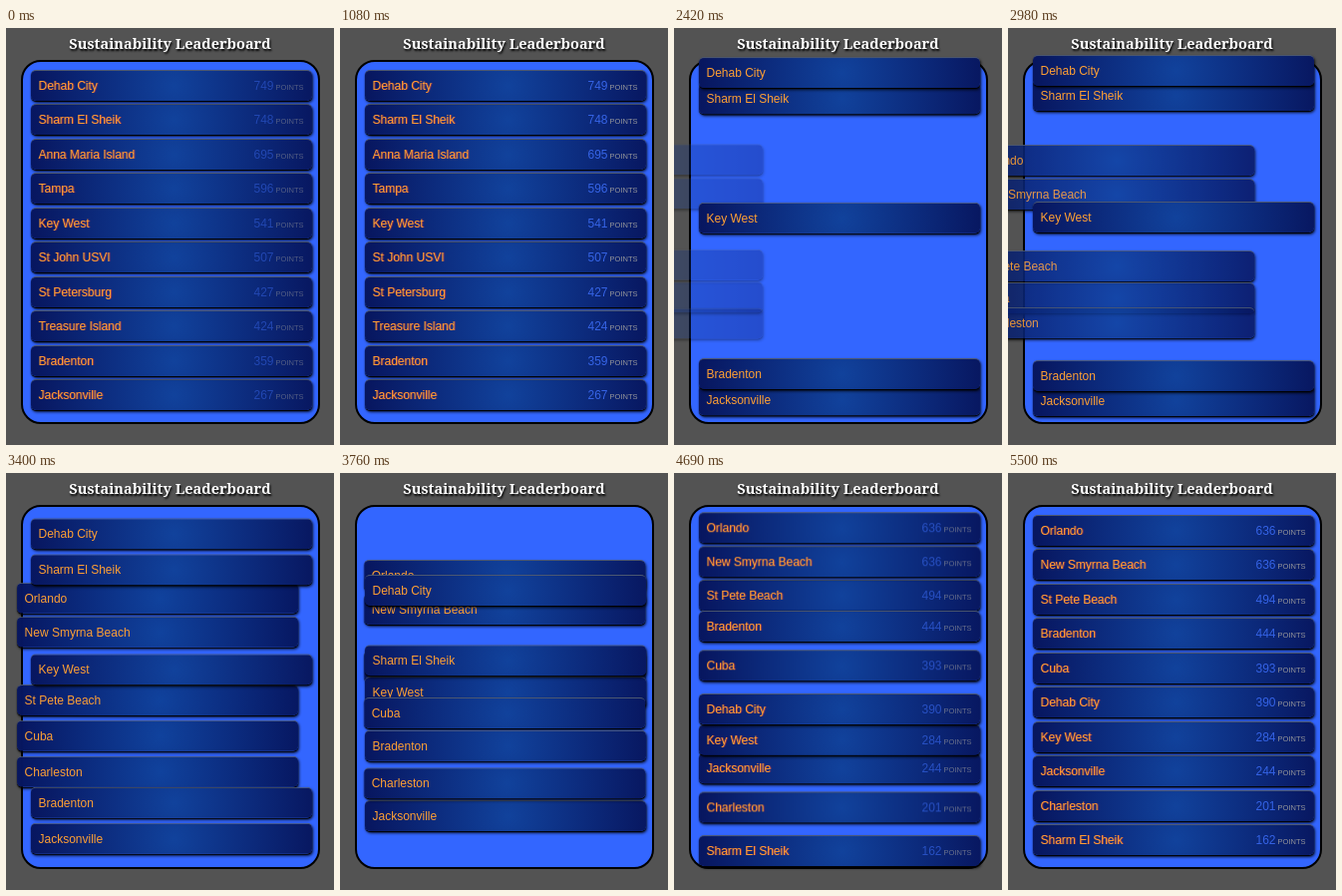
Recreate the animation shown at these times as an HTML page. Size 329 by 418 pixels, loop 6140 ms.

```html
<!DOCTYPE html>
<html lang="en">
<head>
<meta charset="utf-8">
<title>Sustainability Leaderboard</title>
<style>
html, body { margin: 0; width: 100%; height: 100%; overflow: hidden; background: #535353; }
h1 {
  position: absolute; left: 0; top: 5px; width: 329px; margin: 0;
  font: bold 14.55px/20px "Noto Serif", serif; text-align: center; white-space: nowrap;
  color: #fff; text-shadow: 1px 2px 2px #000;
}
#board {
  position: absolute; left: 15px; top: 32px; width: 296px; height: 361px;
  border: 2px solid #000; border-radius: 20px; background: #36f;
}
.row {
  position: absolute; left: 25px; top: 0; width: 282px; height: 31px; box-sizing: border-box;
  padding: 0 9px 0 7.5px; border-top: 1px solid #4c5872; border-radius: 5px;
  background: radial-gradient(circle 150px at 51% 50%, #11429c, #0c2b7d 50%, #07145c);
  box-shadow: 1px 2px 3px #000c, 0 1px 1px #000;
  font: 12px/30px "Liberation Sans", Arial, sans-serif; white-space: nowrap; color: #ffa033;
}
.still .row { text-shadow: 1px 0 0 #ff404080; }
.pts { position: absolute; right: 8.5px; top: 0; color: #3664e6; text-shadow: none; }
.pts small { font-size: 7.5px; color: #96969a; }
</style>
</head>
<body>
<h1>Sustainability Leaderboard</h1>
<div id="board"></div>
<div id="rows"></div>
<script>
const LOOP = 6140, SWAP = 2010, ENTER = 2120, SHOW = 4080;
// moments at which the picture is refreshed
const TICKS = [0, 510, 1080, 2010, 2130, 2270, 2420, 2560, 2710, 2860, 2980, 3130, 3250,
  3400, 3520, 3640, 3760, 3910, 4030, 4150, 4290, 4415, 4540, 4690, 4810, 4960, 5230, 5500];
const MOVE = { delay: 1950, duration: 2900, easing: 'cubic-bezier(.94,-.55,.45,1.46)' };
const SLIDE = { delay: ENTER, duration: 1770, easing: 'ease' };
const FADE = { ...SLIDE, duration: 1450 };

// name, first rank, first points, last rank, last points; lowest layer first
const PLACES = [
  ['Anna Maria Island', 2, 695],
  ['Tampa', 3, 596],
  ['St John USVI', 5, 507],
  ['St Petersburg', 6, 427],
  ['Treasure Island', 7, 424],
  ['St Pete Beach', 5, 0, 2, 494],
  ['New Smyrna Beach', 3, 0, 1, 636],
  ['Orlando', 2, 0, 0, 636],
  ['Jacksonville', 9, 267, 7, 244],
  ['Key West', 4, 541, 6, 284],
  ['Cuba', 6, 0, 4, 393],
  ['Charleston', 7, 0, 8, 201],
  ['Sharm El Sheik', 1, 748, 9, 162],
  ['Dehab City', 0, 749, 5, 390],
  ['Bradenton', 8, 359, 3, 444]
];

const stage = document.getElementById('rows');
const anims = [], spans = [];
const rankY = rank => `0 ${Math.round(42 + 34.45 * rank)}px`;

function play(el, frames, timing) {
  const a = el.animate(frames, { fill: 'both', ...timing });
  a.pause();
  anims.push(a);
}

function during(el, from, to) {
  spans.push({ el, from, to });
}

function addPoints(row, value, delay, from, to) {
  if (!value) return;
  const el = document.createElement('span');
  el.className = 'pts';
  el.innerHTML = `${value}<small> POINTS</small>`;
  row.append(el);
  play(el, { opacity: [0, 1] }, { delay, duration: 1500, easing: 'ease' });
  during(el, from, to);
}

for (const [name, rank, points, nextRank, nextPoints] of PLACES) {
  const row = document.createElement('div');
  row.className = 'row';
  row.textContent = name;
  stage.append(row);
  row.style.translate = rankY(rank);
  addPoints(row, points, -470, 0, SWAP);
  addPoints(row, nextPoints, SHOW, SHOW, LOOP);
  if (!nextPoints) {
    during(row, 0, SWAP);
    continue;
  }
  play(row, { translate: [rankY(rank), rankY(nextRank)] }, MOVE);
  if (!points) {
    play(row, { transform: ['translateX(-282px)', 'none'] }, SLIDE);
    play(row, { opacity: [0, 1] }, FADE);
    during(row, ENTER, LOOP);
  }
}

function draw(now) {
  const time = now % LOOP;
  const t = TICKS.findLast(tick => tick <= time);
  for (const a of anims) a.currentTime = t;
  for (const { el, from, to } of spans) el.style.display = t >= from && t < to ? '' : 'none';
  stage.className = t < SWAP || t >= SHOW ? 'still' : '';
}

const start = performance.now();
function loop() {
  draw(performance.now() - start);
  requestAnimationFrame(loop);
}
loop();
</script>
</body>
</html>
```
